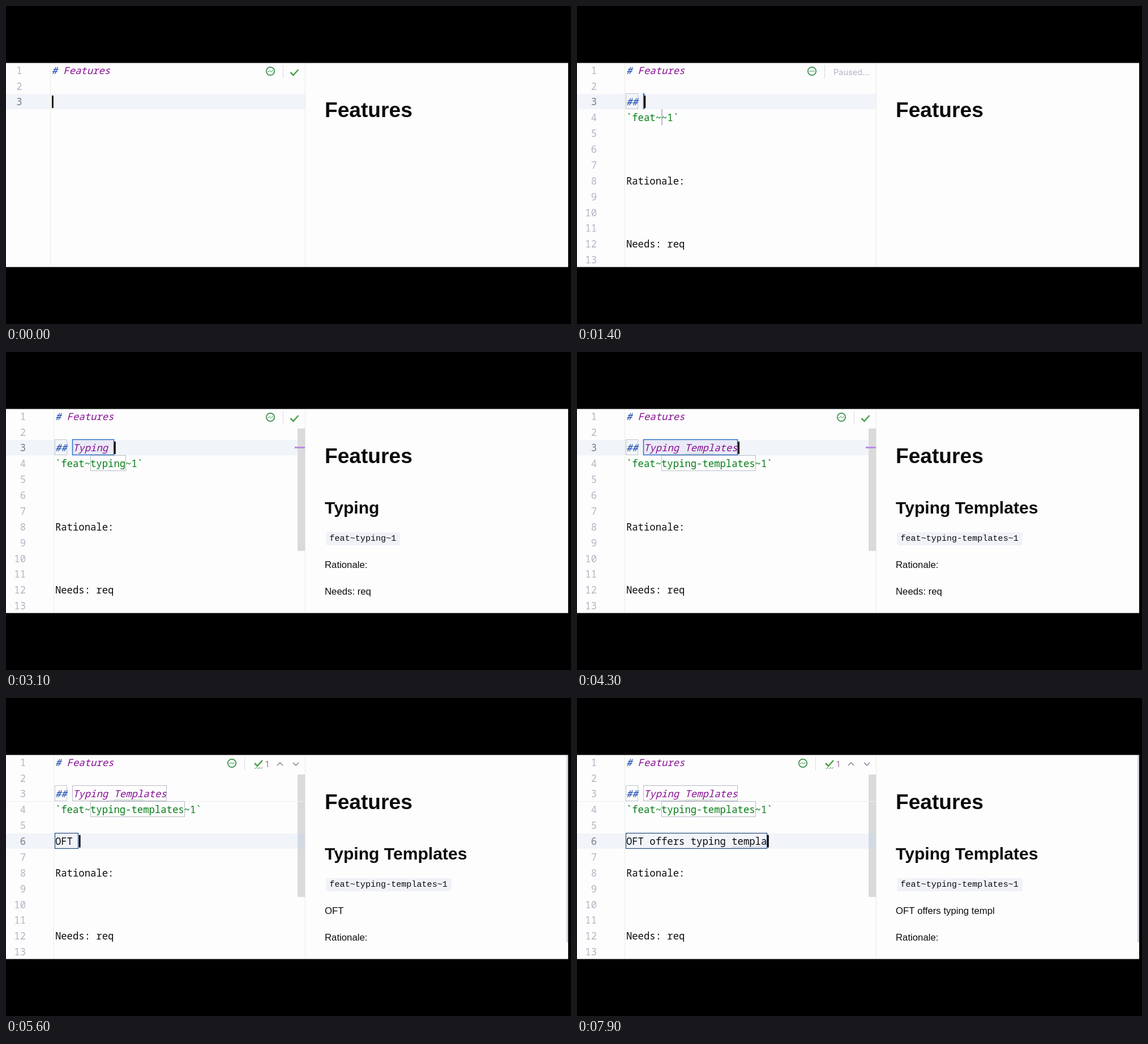
An HTML page with a canvas for the animation above (8000 ms loop, 998 px wide and 561 px high).

```html
<!DOCTYPE html>
<html lang="en">
<head>
<meta charset="utf-8">
<title>Typing templates</title>
<style>
html, body { margin: 0; width: 100%; height: 100%; overflow: hidden; background: #000; }
canvas { display: block; }
</style>
</head>
<body>
<canvas id="stage" width="998" height="561"></canvas>
<script>
const ctx = document.getElementById('stage').getContext('2d');
const LOOP = 8000, STEP = 100, CHAR = 10.36, ROW = 27.87;
const MONO = '500 17.25px "Noto Sans Mono", "DejaVu Sans Mono", monospace';
const SANS = '"Liberation Sans", Arial, sans-serif';
const UI = 'Inter, sans-serif';
const BODY = '16.75px ' + SANS;
const CODE = '15.1px "Liberation Mono", monospace';
const GREEN = '#067d17', BLUE = '#0c3da8', PURPLE = '#871094', INK = '#0b0b0e';

// Moments at which the editor state changes, in ms.
const AT = { popup: 300, paused: 700, insert: 1300, preview: 1700, checked: 1900,
             body: 4500, warning: 4900 };

// Each burst types one character per step.
const PREFIX = [[100, 'fe']];
const TITLE = [[2200, 'Typ'], [2600, 'i'], [2800, 'ng '], [3400, 'Templates']];
const SENTENCE = [[5200, 'OFT '], [5700, 'offers'], [6500, ' typing '], [7400, 'templa']];

function typed(bursts, t) {
  return bursts.map(([start, text]) =>
    text.slice(0, Math.max(0, Math.floor((t - start) / STEP) + 1))).join('');
}

const slug = title => title.trim().toLowerCase().replace(/ /g, '-');
const rowTop = line => 99.5 + ROW * (line - 1);

function rect(x, y, w, h, color) {
  ctx.fillStyle = color;
  ctx.fillRect(x, y, w, h);
}

function rounded(x, y, w, h, r, color) {
  ctx.beginPath();
  ctx.roundRect(x, y, w, h, r);
  ctx.fillStyle = color;
  ctx.fill();
}

function text(str, x, y, font, color, align = 'left') {
  ctx.font = font;
  ctx.textAlign = align;
  ctx.fillStyle = color;
  ctx.fillText(str, x, y);
}

function line(points, color, width) {
  ctx.beginPath();
  points.forEach(([x, y]) => ctx.lineTo(x, y));
  ctx.strokeStyle = color;
  ctx.lineWidth = width;
  ctx.stroke();
}

function wave(x, y, length, color) {
  const points = [];
  for (let d = 0; d <= length; d += 1) points.push([x + d, y + 1.2 * Math.sin(d * 1.25)]);
  line(points, color, 1);
}

function frame(x, row, chars, color, width = 1) {
  ctx.strokeStyle = color;
  ctx.lineWidth = width;
  ctx.strokeRect(Math.floor(x) + 0.5, Math.round(rowTop(row)) - 0.5,
                 Math.round(chars * CHAR) || 1, 27);
}

function code(str, x, row, color, italic) {
  text(str, x, rowTop(row) + 20.2, (italic ? 'italic ' : '') + MONO, color);
}

function caret(x, row) {
  rect(x + 0.4, rowTop(row) + 2.8, 2.8, 22, '#000');
}

function check(x, y) {
  line([[x - 7, y], [x - 2, y + 5], [x + 7, y - 5]], '#51a351', 2.6);
}

function toolbar(t) {
  const paused = t >= AT.paused && t < AT.checked;
  const warning = t >= AT.warning;
  const x = paused ? 415 : warning ? 399 : 467;
  ctx.beginPath();
  ctx.arc(x, 115, 7.2, 0, Math.PI * 2);
  ctx.strokeStyle = '#35904c';
  ctx.lineWidth = 1.7;
  ctx.stroke();
  wave(x - 5, 115, 10, '#35904c');
  rect(x + 22, 104, 1, 24, '#d9dbe2');
  if (paused) {
    text('Paused...', 453, 122, '14.6px ' + UI, '#b5b3c9');
  } else if (warning) {
    check(446, 115);
    wave(439, 123.5, 14, '#51a351');
    text('1', 458, 122, '15px ' + UI, '#a07a9c');
    line([[479, 119], [484, 114], [489, 119]], '#777b88', 1.4);
    line([[507, 114], [512, 119], [517, 114]], '#777b88', 1.4);
  } else {
    check(509.5, 117);
  }
}

function editor(t) {
  const inserted = t >= AT.insert, inBody = t >= AT.body;
  const shift = inserted ? 6.3 : 0, x = 80.6 + shift;
  const current = inBody ? 6 : 3;

  rect(0, rowTop(current), 528, ROW - 0.8, '#f1f4f9');
  rect(78 + Math.round(shift), 101, 1, 359, '#e9eae2');
  for (let n = 1; n <= (inserted ? 13 : 3); n++) {
    text(n, 28.7 + shift, rowTop(n) + 20.2, MONO, n === current ? '#777b8a' : '#b2b5c4', 'right');
  }
  code('#', x, 1, BLUE, true);
  code('Features', x + 2 * CHAR, 1, PURPLE, true);

  if (!inserted) {
    const prefix = typed(PREFIX, t);
    code(prefix, x, 3, INK);
    if (t < 700 || t >= 1200) caret(x + prefix.length * CHAR, 3);
    toolbar(t);
    return;
  }

  const title = typed(TITLE, t), id = slug(title);
  const titleX = x + 3 * CHAR, idX = x + 6 * CHAR;
  if (t >= AT.checked) rect(515, 135, 13.5, 216, '#dadada');
  if (inBody) {
    rect(0, 182, 528, 1, '#eeeff4');
    rect(515, 239, 13.5, 26, '#d3d9e2');
  } else {
    rect(titleX, rowTop(3), title.length * CHAR, ROW - 1, '#e9eaf6');
    if (title) rect(510, 167, 18.5, 3, '#bb8ce2');
  }

  frame(x, 3, 2, '#c3c6ce');
  code('##', x, 3, BLUE, true);
  frame(titleX, 3, title.length, inBody ? '#b9bcc6' : '#2b6fcb', inBody ? 1 : 1.5);
  code(title, titleX, 3, PURPLE, true);
  if (t >= 4200) wave(x + 10 * CHAR, 179.5, 52, '#b4c8b2');
  frame(idX, 4, id.length, '#b9bcc6');
  code('`feat~' + id + '~1`', x, 4, GREEN);
  code('Rationale:', x, 8, INK);
  code('Needs: req', x, 12, INK);

  if (inBody) {
    const body = typed(SENTENCE, t);
    frame(x, 6, body.length, '#234a78', 1.2);
    code(body, x, 6, INK);
    if (t >= 7500) wave(x + 18 * CHAR, 263, (body.length - 18) * CHAR, '#a9b4d6');
    caret(x + body.length * CHAR, 6);
  } else {
    caret(titleX + title.length * CHAR, 3);
  }
  toolbar(t);
}

function preview(t) {
  const x = 563, title = typed(TITLE, t - STEP).trim();
  const body = typed(SENTENCE, t - STEP).trim();
  text('Features', x, 196, 'bold 37.15px ' + SANS, INK);
  if (t < AT.preview) return;

  let y = 297;
  if (title) {
    text(title, x, 284.5, 'bold 30.1px ' + SANS, INK);
    y += 36;
  }
  const id = 'feat~' + slug(title) + '~1';
  rounded(565.5, y - 15, id.length * 9.06 + 13, 23, 3, '#f0f2f8');
  text(id, 571.5, y, CODE, INK);
  for (const paragraph of [body, 'Rationale:', 'Needs: req'].filter(Boolean)) {
    y += 47.7;
    text(paragraph, x, y, BODY, INK);
  }
  if (body) rect(990, 101, 3, 330, '#d0d1da');
}

function popup(t) {
  ctx.save();
  ctx.shadowColor = 'rgba(70, 70, 130, 0.36)';
  ctx.shadowBlur = 20;
  ctx.shadowOffsetY = 5;
  rounded(36.5, 181.5, 789, 73.5, 2, '#b9bcb6');
  ctx.restore();
  rect(37.7, 182.7, 786.6, 71, '#fcfdfd');
  rounded(42, 188, 777, 30.5, 4, '#d4dde9');

  // Stamp icon
  ctx.beginPath();
  ctx.arc(64.5, 199, 3.6, Math.PI * 0.75, Math.PI * 0.25);
  ctx.lineTo(67, 205);
  ctx.lineTo(73, 205);
  ctx.lineTo(73, 208);
  ctx.lineTo(56, 208);
  ctx.lineTo(56, 205);
  ctx.lineTo(62, 205);
  ctx.closePath();
  ctx.strokeStyle = '#747887';
  ctx.lineWidth = 1.4;
  ctx.stroke();
  line([[57, 211], [72, 211]], '#747887', 1.4);

  const match = typed(PREFIX, t), y = 209;
  text(match, 80.3, y, MONO, '#3974cf');
  text('feat'.slice(match.length), 80.3 + match.length * CHAR, y, MONO, '#24262c');
  text('OFT Feature', 802, y, MONO, '#80848c', 'right');
  text('Press Enter to insert, Tab to replace', 52.5, 242.5, '16.1px ' + UI, '#7f838e');
  text('Next Tip', 335, 242.5, '16.1px ' + UI, '#2f62bd');

  ctx.beginPath();
  ctx.arc(774.7, 233, 6.6, 0, Math.PI * 2);
  ctx.fillStyle = '#ffaf0f';
  ctx.fill();
  rect(771.5, 236, 6.5, 5, '#ffaf0f');
  rect(771.5, 242.5, 6.5, 2, '#747887');
  for (const dotY of [229, 236, 243]) rounded(799.2, dotY - 1.2, 2.4, 2.4, 1, '#686c7a');
}

function draw(t) {
  rect(0, 0, 998, 561, '#000');
  ctx.save();
  ctx.beginPath();
  ctx.rect(0, 100.5, 993, 360);
  ctx.clip();
  rect(0, 100, 993, 361, '#fdfdfd');
  editor(t);
  rect(528, 101, 1, 359, '#eaebe4');
  preview(t);
  if (t >= AT.popup && t < AT.insert) popup(t);
  ctx.restore();
}

const start = performance.now();
function tick() {
  draw((performance.now() - start) % LOOP);
  requestAnimationFrame(tick);
}
tick();
</script>
</body>
</html>
```
